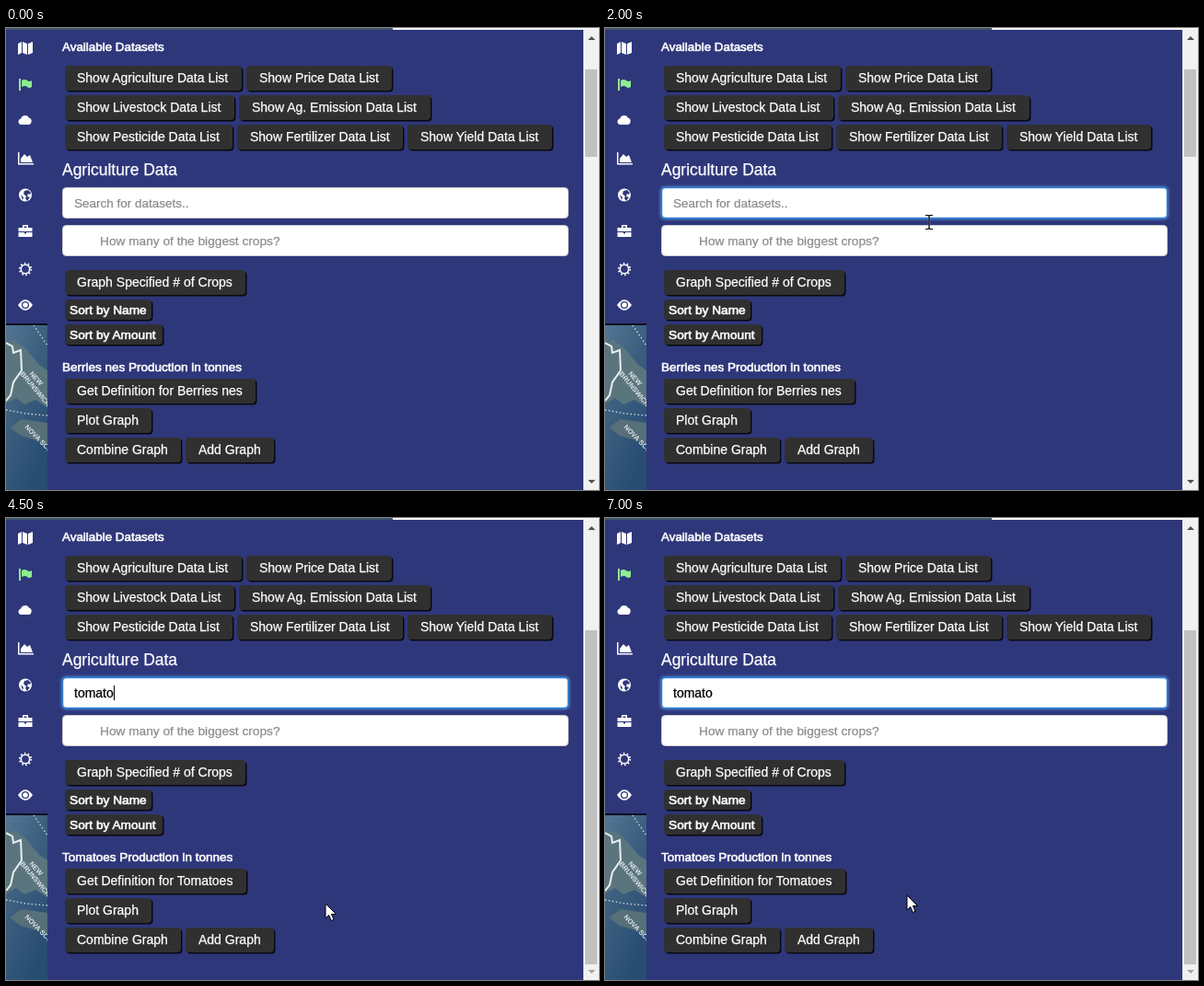
Write an HTML page that moves like this. It is 644 px wide and 502 px high and loops after 7200 ms.

```html
<!DOCTYPE html>
<html lang="en">
<head>
<meta charset="utf-8">
<title>Available Datasets</title>
<style>
  html, body { margin: 0; width: 100%; height: 100%; overflow: hidden; background: #2f377b; }
  svg { display: block; width: 644px; height: 502px; font-family: "Liberation Sans", Arial, sans-serif; }
  text { white-space: pre; }
  .label { stroke: #fff; stroke-width: .25; }
  .heavy { stroke: #fff; stroke-width: .6; }
</style>
</head>
<body>
<svg viewBox="0 0 644 502" fill="#fff">
  <defs>
    <linearGradient id="sea" x2=".6" y2="1">
      <stop stop-color="#527693"/><stop offset=".5" stop-color="#3b5e7e"/><stop offset="1" stop-color="#284d73"/>
    </linearGradient>
    <filter id="glow" x="-5%" y="-50%" width="110%" height="200%"><feGaussianBlur stdDeviation="1.8"/></filter>
    <filter id="shade" x="-5%" y="-20%" width="110%" height="150%"><feGaussianBlur stdDeviation=".7"/></filter>
    <clipPath id="mapArea"><path d="M0 322h45v180H0z"/></clipPath>
  </defs>

  <rect width="644" height="502" fill="#2f377b"/>
  <path fill="#41566c" d="M0 0h420v2H0z"/>
  <path fill="#f4f5f6" d="M420 0h224v2H420z"/>

  <g clip-path="url(#mapArea)">
    <rect y="322" width="45" height="180" fill="url(#sea)"/>
    <path fill="#5b757e" d="M0 343L9 339L22 349L36 366L45 372V412L32 404L20 409L11 402L0 408z"/>
    <path fill="#566f79" d="M4 434L17 425L45 429V453L30 447L16 443z"/>
    <path fill="none" stroke="#e6edf0" stroke-width="2" d="M0 342L7 346L8 353L16 350L17 372L8 385L5 399L0 405"/>
    <path fill="none" stroke="#d3dee5" stroke-width="1.300" stroke-dasharray="1.5 2.5" d="M0 415L22 419L45 421M30 323L45 345"/>
    <g fill="#e0e7ea" font-size="7.500" font-weight="bold">
      <text transform="translate(25 376) rotate(48)">NEW</text>
      <text transform="translate(15 376) rotate(50)">BRUNSWICK</text>
      <text transform="translate(20 434) rotate(46)">NOVA SCOTIA</text>
    </g>
  </g>
  <path fill="#0c0e20" d="M0 321h45v2H0z"/>

  <!-- sidebar icons -->
  <path d="M13 17l4-2v12l-4 2zM18 15l5 2v12l-5-2zM24 17l5-2v12l-5 2z"/>
  <path fill="#8fec90" d="M14 55h2v13h-2zM17 57q3-2 6 0t5 0v7q-3 2-5 0t-6 0z"/>
  <path d="M16 105a3.4 3.4 0 0 1 0-6.6a5 5 0 0 1 9-1a4 4 0 0 1 0 7.6z"/>
  <path d="M13 135h1.5v12H30v1.500H13zM16 146v-4l4-5 3 3 3-2 3 8z"/>
  <circle cx="21" cy="181.500" r="7"/>
  <path fill="#2f377b" d="M20 177l4-1 3 3-1 2-2-1-1 3 3 1-3 4-2-3 1-2-3-3zM16 181l3 3-1 3z"/>
  <path d="M18 217v-3h6v3h4.500v4h-15v-4zM19.500 217h3v-1.500h-3zM13.500 222H20v1.500h2V222h6.500v5h-15z" fill-rule="evenodd"/>
  <circle cx="21" cy="262" r="4.700" fill="none" stroke="#fff" stroke-width="1.600"/>
  <circle cx="21" cy="262" r="6.300" fill="none" stroke="#fff" stroke-width="1.800" stroke-dasharray="1.6 2.358"/>
  <path d="M13 301q8-11.500 16 0q-8 11.500-16 0z"/>
  <circle cx="21" cy="301" r="3.400" fill="none" stroke="#2f377b" stroke-width="1.300"/>

  <!-- headings and fields -->
  <text x="61" y="25" font-size="13.4" class="heavy">Available Datasets</text>
  <text x="61" y="160" font-size="17.45" class="label">Agriculture Data</text>
  <rect id="halo" x="60" y="172" width="552" height="36" rx="5" fill="#58a2ea" filter="url(#glow)"/>
  <rect x="61.500" y="173.500" width="549" height="33" rx="4" stroke="#ccc"/>
  <rect id="focusBorder" x="61.500" y="173.500" width="549" height="33" rx="4" fill="none" stroke="#2f80d8" stroke-width="1.500"/>
  <rect x="61.500" y="214.500" width="549" height="33" rx="4" stroke="#ccc"/>
  <text id="query" x="74" y="195" stroke-width=".25"></text>
  <rect id="caret" y="182" width="1" height="16" fill="#000"/>
  <text x="102" y="236" font-size="13.7" fill="#8c8c8c" stroke="#8c8c8c" stroke-width=".25">How many of the biggest crops?</text>
  <text id="crop" x="61" y="373" font-size="13.5" class="heavy"></text>
  <g id="buttons"></g>

  <!-- scrollbar -->
  <path fill="#f1f1f1" d="M627 2h17v500h-17z"/>
  <rect id="thumb" x="629" width="13" fill="#c1c1c1"/>
  <path fill="#505050" d="M632 13l4-4 4 4z"/>
  <path id="downArrow" d="M632 491l4 4 4-4z"/>

  <g id="ibeam" fill="none">
    <path stroke="#d8dcf0" stroke-opacity=".45" stroke-width="2.500" d="M0-6V6"/>
    <path stroke="#000" stroke-width="1.200" d="M-4-7.500h3l1 1 1-1h3M0-7V7M-4 7.500h3l1-1 1 1h3"/>
  </g>
  <path id="arrow" stroke="#000" d="M0 0V16L3.700 12.500L6.300 18.500L9 17.300L6.400 11.500H11.500z"/>
</svg>
<script>
const LOOP = 7200;
const CLICK = 1100;
const BLINK = 530;
const WORD = 'tomato';
const KEY_TIMES = [2100, 2300, 2500, 2700, 2900, 3200];
const $ = id => document.getElementById(id);

function addButton(x, y, width, label, { height = 27, pad = 13, size = 14, weight = 'label' } = {}) {
  const box = (offset, attributes) =>
    `<rect x="${x + offset}" y="${y + offset}" width="${width}" height="${height}" rx="4" ${attributes}/>`;
  const group = document.createElementNS('http://www.w3.org/2000/svg', 'g');
  group.innerHTML = box(1.5, 'fill="#08090f" filter="url(#shade)"') + box(0, 'fill="#303031"') +
    `<text x="${x + pad}" y="${Math.round(y + height / 2 + 4.5)}" font-size="${size}" class="${weight}">${label}</text>`;
  $('buttons').append(group);
  return group;
}

const small = { height: 22, pad: 5, size: 13.7, weight: 'heavy' };
addButton(64, 41, 192, 'Show Agriculture Data List');
addButton(261, 41, 158, 'Show Price Data List', { pad: 14 });
addButton(64, 73, 184, 'Show Livestock Data List');
addButton(253, 73, 208, 'Show Ag. Emission Data List', { pad: 14 });
addButton(64, 105, 182, 'Show Pesticide Data List');
addButton(251, 105, 180, 'Show Fertilizer Data List', { pad: 14 });
addButton(436, 105, 157, 'Show Yield Data List', { pad: 14 });
addButton(64, 263, 196, 'Graph Specified # of Crops');
addButton(64, 295, 94, 'Sort by Name', small);
addButton(64, 322, 106, 'Sort by Amount', small);
const berries = addButton(64, 381, 207, 'Get Definition for Berries nes');
const tomatoes = addButton(64, 381, 197, 'Get Definition for Tomatoes');
addButton(64, 413, 94, 'Plot Graph');
addButton(64, 445, 126, 'Combine Graph');
addButton(195, 445, 96, 'Add Graph', { pad: 14 });

// Pointer path: time, x, y
const PATH = [
  [0, 560, 525], [100, 540, 500], [400, 425, 345], [600, 368, 271], [700, 356, 254],
  [900, 352, 211], [3900, 352, 211], [4200, 353, 310], [4500, 347, 419], [4700, 328, 440],
  [4900, 295, 443], [5100, 255, 415], [5300, 228, 368], [5500, 224, 335], [5800, 262, 338],
  [6100, 305, 365], [6500, 328, 410], [LOOP, 328, 410]
];

function pointerAt(t) {
  const i = PATH.findIndex(p => p[0] > t);
  const [t0, x0, y0] = PATH[i - 1], [t1, x1, y1] = PATH[i];
  const k = (t - t0) / (t1 - t0);
  return [x0 + (x1 - x0) * k, y0 + (y1 - y0) * k];
}

const show = (el, on) => el.setAttribute('visibility', on ? 'visible' : 'hidden');

function draw(t) {
  const typed = KEY_TIMES.filter(k => k <= t).length;
  const filtered = typed >= 3;
  const focus = Math.min(1, Math.max(0, (t - CLICK) / 200));
  const query = $('query');
  const ink = typed ? '#000' : '#8c8c8c';

  query.textContent = typed ? WORD.slice(0, typed) : 'Search for datasets..';
  query.setAttribute('fill', ink);
  query.setAttribute('stroke', ink);
  query.setAttribute('font-size', typed ? 14 : 13.5);
  $('halo').setAttribute('opacity', focus * 0.7);
  $('focusBorder').setAttribute('opacity', focus);

  const lastInput = typed ? KEY_TIMES[typed - 1] : CLICK;
  show($('caret'), t >= CLICK && Math.floor((t - lastInput) / BLINK) % 2 === 0);
  $('caret').setAttribute('x', typed ? Math.round(74 + query.getComputedTextLength()) : 74);

  $('crop').textContent = (filtered ? 'Tomatoes' : 'Berries nes') + ' Production in tonnes';
  show(berries, !filtered);
  show(tomatoes, filtered);
  $('thumb').setAttribute('y', filtered ? 122 : 45);
  $('thumb').setAttribute('height', filtered ? 363 : 95);
  $('downArrow').setAttribute('fill', filtered ? '#a3a3a3' : '#505050');

  const [x, y] = pointerAt(t);
  const overField = y < 256;
  for (const id of ['ibeam', 'arrow']) $(id).setAttribute('transform', `translate(${x} ${y})`);
  show($('ibeam'), overField);
  show($('arrow'), !overField);
}

const start = performance.now();
function tick() {
  const t = (performance.now() - start) % LOOP;
  draw(Math.floor(t / 100) * 100);
  requestAnimationFrame(tick);
}
tick();
</script>
</body>
</html>
```
